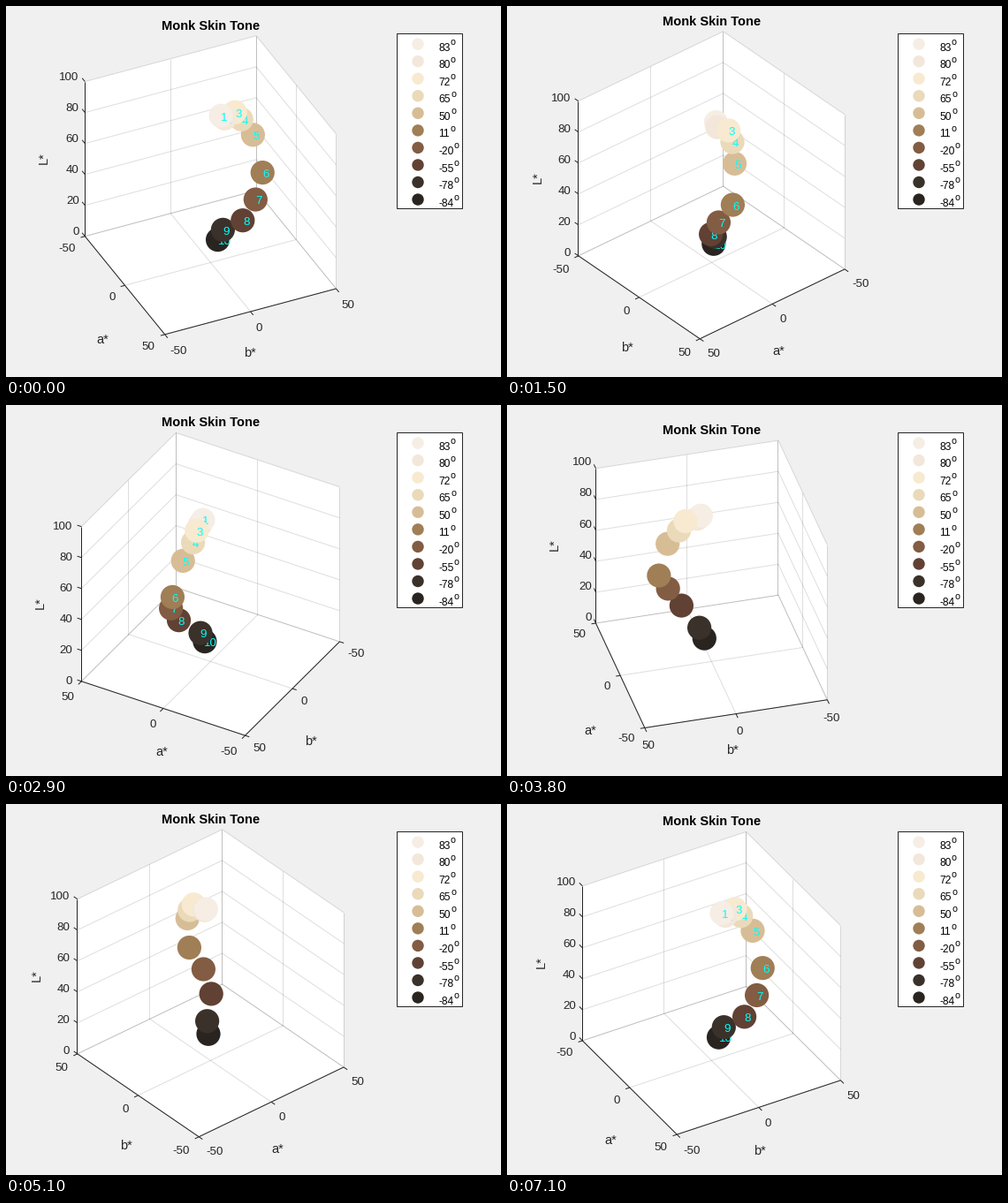
Write a matplotlib script that moves like this. It is 560 by 420 pixels and loops after 7.2 s.

```python
import numpy as np
import matplotlib.pyplot as plt
from matplotlib.animation import FuncAnimation
from matplotlib.patches import Circle, Polygon, Rectangle

W, H, DPI = 560, 420, 100
FRAMES, INTERVAL = 72, 100
CX, CY = 231.4, 202.8          # centre of the cube on screen
SCALE = 2.138                  # pixels per data unit
ELEV = np.radians(35)
SIN_E, COS_E = np.sin(ELEV), np.cos(ELEV)
INK = "#262626"
TICK = 5
LABEL_GAP = 10.6
NUDGE = 0.15                   # digits sit slightly off their dots, towards +a and +b

# colour, L*, a*, b*
TONES = [
    ("#f6ede4", 94.21, 1.50, 5.42),
    ("#f3e7db", 92.28, 2.06, 7.28),
    ("#f7ead0", 93.09, 0.22, 14.21),
    ("#eadaba", 87.57, 0.46, 17.75),
    ("#d7bd96", 77.90, 3.47, 23.14),
    ("#a07e56", 55.14, 7.78, 26.74),
    ("#825c43", 42.47, 12.33, 20.53),
    ("#604134", 30.68, 11.67, 13.34),
    ("#3a312a", 21.07, 2.69, 5.96),
    ("#292420", 14.61, 1.48, 3.53),
]

plt.rcParams["font.family"] = "Liberation Sans"
fig = plt.figure(figsize=(W / DPI, H / DPI), dpi=DPI, facecolor="#f0f0f0")
ax = fig.add_axes([0, 0, 1, 1])
ax.set_xlim(0, W)
ax.set_ylim(H, 0)
ax.axis("off")
moving = []


def points(px):
    return px * 72 / DPI


def write(x, y, s, px, color=INK, ha="center", **kw):
    """Text whose capitals are centred on y."""
    return ax.text(x, y + 0.36 * px, s, fontsize=points(px), color=color,
                   ha=ha, va="baseline", **kw)


def draw_legend():
    ax.add_patch(Rectangle((442, 31), 74, 198, fc="white", ec=INK, lw=0.72))
    for i, (color, L, a, b) in enumerate(TONES):
        y = 43.1 + 19.55 * i
        ax.add_patch(Circle((466, y), 6.7, fc=color, lw=0))
        angle = f"{np.degrees(np.arctan2(L - 50, b)):.0f}"
        text = write(489, y + 3.3, angle, 12, "black", "left")
        # raised "o" right after the number
        ax.annotate("o", (1, y + 1), xycoords=(text, "data"), xytext=(0.4, 0),
                    textcoords="offset points", fontsize=points(10.6),
                    ha="left", va="baseline")


class View:
    def __init__(self, az):
        t = np.radians(az)
        self.c, self.s = np.cos(t), np.sin(t)

    def point(self, a, b, L):
        x = CX + SCALE * (a * self.c + b * self.s)
        up = SIN_E * (b * self.c - a * self.s) + COS_E * (L - 50)
        return np.array([x, CY - SCALE * up])

    def depth(self, a, b, L):
        return COS_E * (a * self.s - b * self.c) + SIN_E * L


def unit(v):
    return v / np.hypot(*v)


def line(p, q, color=INK, alpha=1, z=3):
    # upright and level lines fill the pixel they fall in
    level = np.abs(p - q) < 1e-6
    p, q = np.where(level, np.floor(p), p), np.where(level, np.floor(p), q)
    moving.extend(ax.plot([p[0], q[0]], [p[1], q[1]], color=color, alpha=alpha,
                          lw=0.72, solid_capstyle="butt", zorder=z))


def wall(*corners):
    moving.append(ax.add_patch(Polygon(corners, fc="white", lw=0, zorder=1)))


def label(*args, **kw):
    moving.append(write(*args, **kw))


def draw_walls(v, a0, b0):
    P = v.point
    wall(P(-50, -50, 0), P(50, -50, 0), P(50, 50, 0), P(-50, 50, 0))
    wall(P(a0, -50, 0), P(a0, 50, 0), P(a0, 50, 100), P(a0, -50, 100))
    wall(P(-50, b0, 0), P(50, b0, 0), P(50, b0, 100), P(-50, b0, 100))
    pairs = []
    for t in (-50, 0, 50):
        pairs += [((t, -50, 0), (t, 50, 0)), ((-50, t, 0), (50, t, 0)),
                  ((a0, t, 0), (a0, t, 100)), ((t, b0, 0), (t, b0, 100))]
    for L in range(0, 101, 20):
        pairs += [((a0, -50, L), (a0, 50, L)), ((-50, b0, L), (50, b0, L))]
    for p, q in pairs:
        line(P(*p), P(*q), alpha=0.15, z=2)


def draw_floor_axis(name, ends, out, side):
    """ends: screen points of -50 and 50; out: tick direction; side: -1 left, 1 right."""
    p, q = ends
    line(p, q)
    for value, k in ((-50, 0), (0, 0.5), (50, 1)):
        at = p + (q - p) * k
        line(at, at + TICK * out)
        x, y = at + LABEL_GAP * out
        ha = "center"
        if abs(out[0]) > 0.45:
            ha = "left" if side > 0 else "right"
            x -= 0.8
        label(x, y + 9.4, str(value), 13.33, ha=ha)
    cos = abs(q[0] - p[0]) / (100 * SCALE)
    sin = np.sqrt(max(0, 1 - cos * cos))
    x, y = (p + q) / 2
    label(x + side * (48 - 53.8 * cos), y + 32.7 + 30.2 * sin, name + "*", 14.67)


def draw_axes(v, a0, b0):
    front = v.point(-a0, -b0, 0)
    end_a = v.point(a0, -b0, 0)     # far end of the a* axis
    end_b = v.point(-a0, b0, 0)     # far end of the b* axis
    dir_a, dir_b = unit(front - end_a), unit(front - end_b)
    a_side = -1 if end_a[0] < end_b[0] else 1
    ends_a = (end_a, front) if a0 < 0 else (front, end_a)
    ends_b = (end_b, front) if b0 < 0 else (front, end_b)
    draw_floor_axis("a", ends_a, dir_b, a_side)
    draw_floor_axis("b", ends_b, dir_a, -a_side)

    foot, out = (end_a, -dir_a) if a_side < 0 else (end_b, -dir_b)
    rise = np.array([0, -100 * SCALE * COS_E])
    line(foot, foot + rise)
    for L in range(0, 101, 20):
        at = foot + rise * L / 100
        line(at, at + TICK * out)
        x, y = at + LABEL_GAP * out
        label(x, y + 1.4, str(L), 13.33, ha="right")
    x, y = foot + rise / 2
    moving.append(ax.text(x - 42.3, y - 1.5, "L*", fontsize=points(14.67),
                          color=INK, rotation=90, rotation_mode="anchor",
                          ha="center", va="baseline"))


def draw_dots(v):
    for i, (color, L, a, b) in enumerate(TONES):
        x, y = v.point(a, b, L)
        dot = Circle((x, y), 13.6, fc=color, lw=0, zorder=500 + v.depth(a, b, L))
        moving.append(ax.add_patch(dot))
        spot = (a + NUDGE, b + NUDGE, L)
        x, y = v.point(*spot)
        label(x - 0.3, y + 0.4, str(i + 1), 13.33, "cyan", "left",
              zorder=500 + v.depth(*spot))


def draw(frame):
    while moving:
        moving.pop().remove()
    az = 65 + 5 * frame
    v = View(az)
    # on exact quarter turns the edge-on axis stays at the left
    side = View(az - 0.01)
    a0 = -50 if side.s > 0 else 50
    b0 = 50 if side.c > 0 else -50
    draw_walls(v, a0, b0)
    draw_axes(v, a0, b0)
    draw_dots(v)
    top = v.point(a0, b0, 100)[1]
    label(232, top - 12.5, "Monk Skin Tone", 14.67, "black", weight="bold")
    return moving


draw_legend()
anim = FuncAnimation(fig, draw, frames=FRAMES, interval=INTERVAL,
                     init_func=lambda: draw(0), repeat=True, repeat_delay=0)
plt.show()
```
